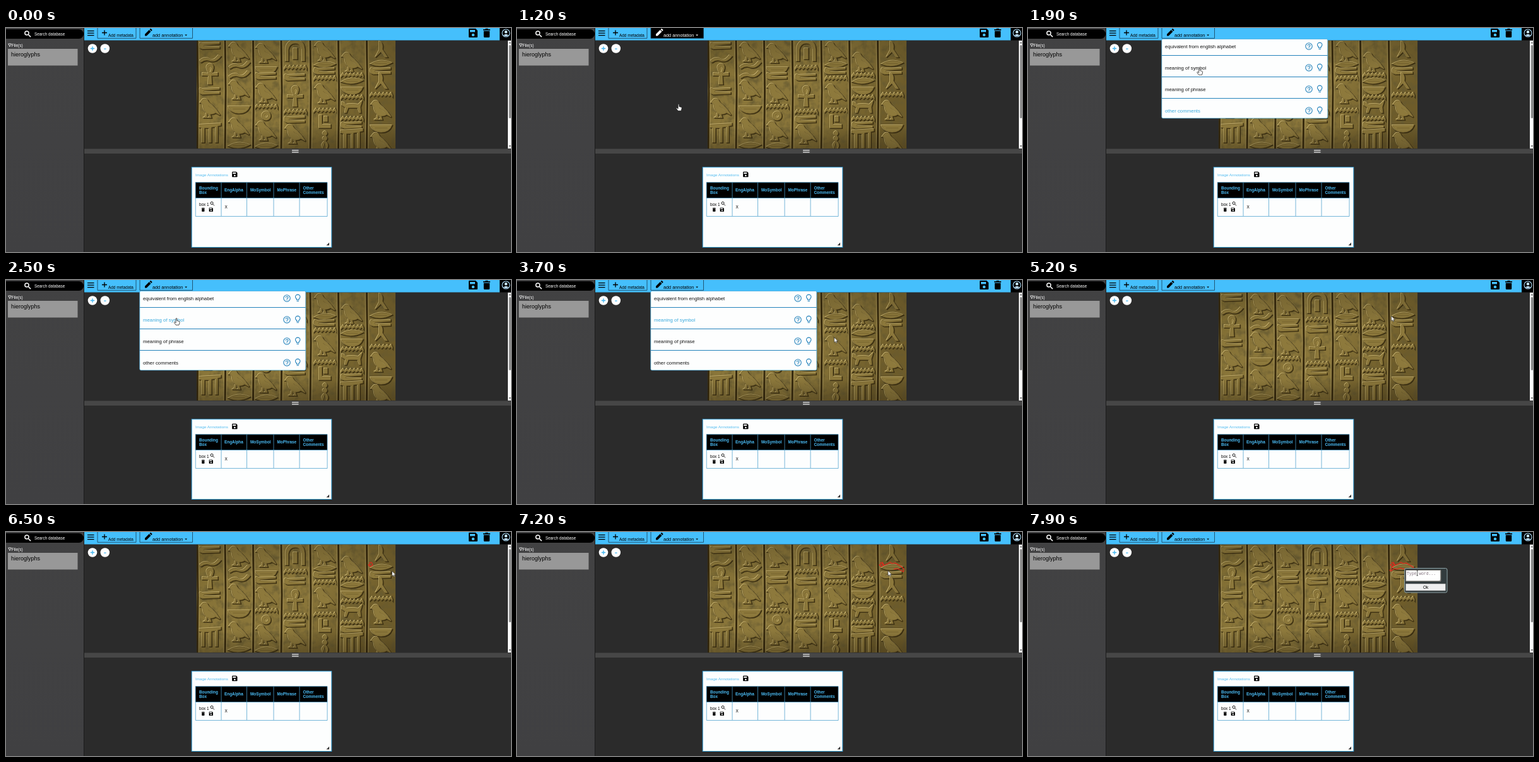
Recreate the animation shown at these times as an HTML page. Size 800x355 px, loop 8 s.

```html
<!DOCTYPE html>
<html lang="en">
<head>
<meta charset="utf-8">
<title>Image annotation</title>
<style>
html, body { margin: 0; width: 100%; height: 100%; overflow: hidden; background: #2b2b2b }
svg { display: block; width: 100vw; height: 100vh }
text { font-family: "Liberation Sans", Arial, sans-serif; font-size: 6.4px }
.menu text { font-size: 7.8px }
.head text { font-weight: bold; fill: #4bbcf5 }
.line { fill: none; stroke: currentColor }
</style>
</head>
<body>
<svg viewBox="0 0 800 355">
<defs>
  <linearGradient id="side" x2="0" y2="1">
    <stop stop-color="#424243"/><stop offset="1" stop-color="#404042"/>
  </linearGradient>
  <linearGradient id="stone" x2="1" y2=".35">
    <stop stop-color="#7c6a31"/><stop offset=".3" stop-color="#8a763a"/>
    <stop offset=".65" stop-color="#8a763a"/><stop offset="1" stop-color="#6e5c2a"/>
  </linearGradient>
  <linearGradient id="shade" x2="0" y2="1">
    <stop stop-color="#20180a" stop-opacity=".2"/><stop offset=".3" stop-opacity="0"/>
    <stop offset=".8" stop-opacity="0"/><stop offset="1" stop-color="#20180a" stop-opacity=".3"/>
  </linearGradient>
  <filter id="mottle" x="0" y="0" width="1" height="1">
    <feTurbulence type="fractalNoise" baseFrequency=".09" numOctaves="3" seed="4"/>
    <feColorMatrix values="0 0 0 0 .13  0 0 0 0 .1  0 0 0 0 .03  2 0 0 0 -.85"/>
  </filter>
  <clipPath id="wall"><path d="M302 20h315v171h-315z"/></clipPath>

  <path id="bird" d="M-16-8L-12-13Q-8-16-4-12Q-2-7 4-3Q11 4 16 12L9 8Q4 11 0 10L2 16H-4L-1 15L-2 10L-4 9L-5 16H-11L-7 14L-6 8Q-11 4-11-3Q-12-8-16-8ZM-3-3Q3 0 9 8"/>
  <path id="eye" d="M-17 1Q0-9 17-1Q0 8-17 1ZM-10 0H9"/>
  <path id="bowl" d="M-17-4H17Q13 7 0 7Q-13 7-17-4ZM-10 0H10"/>
  <path id="wave" d="M-17 1l3-4 3 4 3-4 3 4 3-4 3 4 3-4 3 4 3-4 3 4 3-4 2 4v2l-2-3-3 3-3-3-3 3-3-3-3 3-3-3-3 3-3-3-3 3-3-3-3 3z"/>
  <path id="ankh" d="M-2-1Q-8-11-4-15Q0-18 4-15Q8-11 2-1L12-2V2H2L3 16H-3L-2 2H-12V-2ZM-1-3Q-5-11 0-13Q5-11 1-3Z"/>
  <path id="loop" d="M-17-3Q-17-6-12-4L15-5V-3L-10-1V1L15 2V4L-12 5Q-19 3-17-3Z"/>
  <path id="snake" d="M-16 3Q-8-4 0 1Q6 5 13-5L17-3Q9 7 0 4Q-7 1-14 6Z"/>
  <path id="ball" d="M-7 0a7 7 0 1 0 14 0a7 7 0 1 0-14 0M-3 0a3 3 0 1 0 6 0a3 3 0 1 0-6 0"/>
  <path id="seat" d="M-9-10H-5V5H9V10H-9ZM-1-8H4V0H-1Z"/>
  <path id="gate" d="M-18-12L17-14V-11L12-10V16H9V-9L2-8V16H-1V-7L-9-7V16H-13V-7L-18-8Z"/>
  <path id="arch" d="M-15 15V-4Q-14-18 0-18Q14-18 15-4V15H11V-3Q9-13 0-13Q-9-13-11-3V15ZM-3 12V-5H3V12Z"/>
  <path id="beast" d="M-16-7L-12-6L-9-3Q0-5 10-3L16-9L13 1L14 10H12L9 2H-6L-9 10H-11L-10 2L-16-2Z"/>
  <path id="reed" d="M-3-13Q4-11 2 0L10 12H7L0 3L-9 12L-3 1Z"/>
  <path id="chain" d="M0-13Q7-9 0-5Q-7-9 0-13M0-5Q7-1 0 3Q-7-1 0-5M0 3Q8 8 3 15M0 3Q-8 8-3 15"/>

  <g id="lens" class="line"><circle cx="-1.3" cy="-1.3" r="2.7"/><path d="M.8.8L4 4"/></g>
  <path id="disk" fill-rule="evenodd" d="M-7-6Q-7-7-6-7H4L7-4V6Q7 7 6 7H-6Q-7 7-7 6ZM-5-5V-1.5H3V-5ZM-2.3 3a2.3 2.3 0 1 0 4.6 0a2.3 2.3 0 1 0-4.6 0"/>
  <path id="bin" d="M-5.5-6H-2.5L-1.5-7H1.5L2.5-6H5.5V-4.3H-5.5ZM-4.7-3.3H4.7V5.5Q4.7 7 3.2 7H-3.2Q-4.7 7-4.7 5.5Z"/>
  <path id="pencil" d="M-5.5 2.5L2-5L5-2L-2.5 5.5H-5.5ZM2.8-5.8L4-7Q4.6-7.5 5.2-7L7-5.2Q7.5-4.6 7-4L5.8-2.8Z"/>
</defs>

<rect width="800" height="355" fill="#2b2b2b"/>

<!-- sidebar -->
<rect width="123" height="355" fill="url(#side)"/>
<path d="M123.5 0V355" stroke="#1c1c1c"/>
<path d="M0 2H115.500a7.500 7.500 0 0 1 0 15H0z"/>
<use href="#lens" transform="translate(34.500 9.500) scale(1.150)" color="#fff" stroke-width="1.300"/>
<text x="45" y="11.700" fill="#fff">Search database</text>
<path d="M3.700 25H8.300L6 29.500Z" class="line" color="#fff" stroke-width=".8"/>
<text x="8.800" y="29.800" fill="#fff">File(s)</text>
<rect x="3" y="33" width="110.500" height="26.500" fill="#989898"/>
<text x="8" y="45" style="font-size:9px">hieroglyphs</text>

<!-- photo -->
<g id="photo" clip-path="url(#wall)"><rect x="302" y="20" width="315" height="171" fill="url(#stone)"/></g>

<!-- toolbar -->
<path d="M124 0H782V19.500H124z" fill="#45bffc"/>
<path d="M782 0H800V19.500H782z"/>
<path d="M129 4.700H139.500M129 8.200H139.500M129 11.700H139.500" stroke="#000" stroke-width="1.300"/>
<path d="M145 -1H206V16.300H145z" class="line" color="#1c4a66" stroke-width=".9"/>
<path d="M156 3.500V11.500M152 7.500H160" stroke="#000" stroke-width="1.300"/>
<text x="162" y="14">Add metadata</text>
<g id="addBtn">
  <path id="addBox" d="M212 -1H295.500V16.300H212z" stroke="#1c4a66" stroke-width=".9"/>
  <use href="#pencil" transform="translate(225 7.500) scale(.9)"/>
  <text x="232" y="13.700" style="font-size:7.300px">add annotation</text>
  <path d="M283.300 10.500H287L285.150 12.600z"/>
</g>
<use href="#disk" x="740" y="8"/>
<use href="#bin" x="761.500" y="8"/>
<g class="line" color="#a9d9f5" stroke-width="1.100"><circle cx="792" cy="8" r="6"/></g>
<path d="M789.700 6.200a2.300 2.300 0 1 0 4.600 0a2.300 2.300 0 1 0-4.600 0M788 11.800Q792 7.800 796 11.800Q792 14 788 11.800" fill="#c8e8fa"/>

<g fill="#fff"><circle cx="137" cy="32.500" r="7.300"/><circle cx="156.800" cy="32.500" r="7.300"/></g>
<path d="M137 29.300V35.700M133.800 32.500H140.200M155.200 33.200H158.600" stroke="#3fb4ef" stroke-width="1.300"/>

<!-- scroll bar and divider -->
<path d="M795 20H800V191H795z" fill="#fafafa"/>
<rect x="796.700" y="27" width="3.300" height="116" rx="1.600" fill="#8d8d8d"/>
<path d="M796.500 24.500L798.300 21.500L800 24.500ZM796.500 186L798.300 189L800 186Z" fill="#777"/>
<path d="M124 191.500H800V199H124z" fill="#474747"/>
<path d="M453 193.800H463.500M453 196.800H463.500" stroke="#eee" stroke-width="1.200"/>

<!-- annotation card -->
<rect x="294.200" y="220.700" width="221.600" height="126.800" fill="#fdfefe" stroke="#359fd6"/>
<path d="M512 340V344.500H507.500z" fill="#333"/>
<text x="300" y="234.500" fill="#55bdf0" style="font-size:6.250px">Image Annotations</text>
<use href="#disk" transform="translate(362.300 232) scale(.6)"/>
<path d="M300 244.500H509V269.500H300z"/>
<path d="M300.300 244.800H509V298.500H300.300zM300 269.500H509M341 245V298M381.500 245V298M424 245V298M465 245V298" class="line" color="#4a9fcc" stroke-width=".75"/>
<g class="head">
  <text x="306" y="255.500">Bounding</text><text x="306" y="262.800">Box</text>
  <text x="346" y="259.300">EngAlpha</text><text x="387" y="259.300">MoSymbol</text>
  <text x="429.500" y="259.300">MoPhrase</text>
  <text x="470.500" y="255.500">Other</text><text x="470.500" y="262.800">Comments</text>
</g>
<text x="306" y="282.300">box 1</text><text x="346.500" y="286.300">X</text>
<use href="#lens" transform="translate(327 278.500) scale(.75)" stroke-width="1.200"/>
<use href="#bin" transform="translate(312.300 287.800) scale(.45)"/>
<use href="#disk" transform="translate(324.800 287.800) scale(.45)"/>

<g id="menu" class="menu">
  <rect x="211.800" y="17.500" width="263" height="125.500" rx="2" fill="#fdfefe" stroke="#3aa5dc" stroke-width=".7"/>
</g>

<path id="mark" class="line" color="#e8261c" stroke-width="1.100" stroke-linejoin="round" pathLength="100"
  d="M575 49l4-1 2 4-4 3-3-3 5-2 2 3L588 50l3-2 3 2 5-1 5 3 5 3 4 4-1 4-5-3-5-2-6 1-6-2-6 2-4-1-5 4-2-1 3-4 3-3"/>

<g id="popup">
  <rect x="596.500" y="57.500" width="67.500" height="38.500" rx="2.500" fill="#333c3e" stroke="#8fa5a8"/>
  <path d="M598.500 60.500H654V78H598.500z" fill="#fff" stroke="#111" stroke-width="1.200"/>
  <path d="M598.500 60.500H654V78H598.500z" class="line" color="#e8e5d8" stroke-width=".5"/>
  <text x="600" y="68" fill="#80707c" style="font-family:'Liberation Mono',monospace">Type word...</text>
  <path d="M654 77.500L651.500 77.500L654 75z" fill="#777"/>
  <path d="M598.300 82H661.500V93H598.300z" fill="#efefef" stroke="#777" stroke-width=".6"/>
  <text x="630" y="89.800" text-anchor="middle">Ok</text>
</g>

<g id="cursor" stroke-linejoin="round">
  <path id="arrow" d="M0 0V8L1.900 6.300L3.200 9L4.500 8.400L3.300 5.800H5.800z" fill="#fff" stroke="#222" stroke-width=".6"/>
  <path id="hand" d="M-.9 0Q0-1 .9 0V3.500L4.500 4.500Q5.300 5 5 7L4 10.300H-1L-3.700 6.500Q-3.500 5-2.200 5.900L-.9 7z" fill="#fff" stroke="#111" stroke-width=".7"/>
  <path id="beam" d="M-1.300 0H1.300M0 0V8M-1.300 8H1.300" class="line" color="#333" stroke-width=".8"/>
</g>
</svg>
<script>
const $ = id => document.getElementById(id);
const add = (id, markup) => $(id).insertAdjacentHTML('beforeend', markup);

// Each column: centre x, then "glyph y" pairs from top to bottom
const columns = [
  [323, 'loop 28 snake 48 ankh 73 loop 100 bird 126 gate 165'],
  [369, 'bird 37 snake 58 snake 73 bird 97 bowl 128 bird 157 eye 186'],
  [412, 'bird 39 bowl 66 loop 76 bird 102 wave 124 ball 139 bird 162 eye 187'],
  [458, 'arch 37 wave 62 loop 78 ankh 108 wave 132 loop 145 bird 167'],
  [505, 'bird 36 eye 58 loop 68 wave 79 bird 103 wave 130 seat 148 chain 176'],
  [548, 'bird 53 wave 74 eye 84 bowl 98 wave 109 beast 124 wave 143 loop 154 gate 174'],
  [594, 'reed 34 eye 56 loop 68 reed 84 wave 105 bird 129 bowl 158 bird 180']
];
add('photo', '<rect x="302" y="20" width="315" height="171" filter="url(#mottle)"/>');
for (const [x, list] of columns) {
  const words = list.split(' ');
  for (let i = 0; i < words.length; i += 2) {
    const use = (d, style) =>
      `<use href="#${words[i]}" x="${x + d}" y="${+words[i + 1] + d}" ${style}/>`;
    add('photo', use(1, 'fill="#33280e" stroke="#33280e" stroke-width="2.200" opacity=".85"') +
      use(-.4, 'fill="#947f40" stroke="#c2ae6c" stroke-width="1.100"') +
      use(.4, 'fill="#8d793c" stroke="#5c4a1f" stroke-width=".5" fill-rule="evenodd"'));
  }
}
for (const x of [303, 347, 391.5, 436, 482, 526.5, 571.5])
  add('photo', `<g fill="none"><path d="M${x} 20l1 80-1 91" stroke="#382b0e" stroke-width="3"/>
    <path d="M${x + 2.3} 20l1 80-1 91M${x - 2.3} 20l1 80-1 91" stroke="#a8955a" stroke-width=".9"/></g>`);
add('photo', '<rect x="302" y="20" width="315" height="171" fill="url(#shade)"/>');

['equivalent from english alphabet', 'meaning of symbol', 'meaning of phrase', 'other comments']
  .forEach((label, i) => {
    const y = 29 + i * 34;
    add('menu', `<text class="item" x="217" y="${y + 2.8}">${label}</text>
      <g class="line" color="#2382bb" stroke-width="1.100">
        <circle cx="445" cy="${y}" r="5.200"/>
        <path d="M443.300 ${y - 1}q0-2 1.800-2t1.800 1.700q0 1-1.800 2.200v.8m0 .9v1"/>
        <path d="M460.500 ${y + 2.5}v-1.500q-2-1.300-2-3.200a3.700 3.700 0 0 1 7.400 0q0 1.900-2 3.200v1.500zM460.500 ${y + 4.5}h3.400"/>
        ${i < 3 ? `<path d="M212 ${y + 14.5}H474.500"/>` : ''}
      </g>`);
  });
const items = document.querySelectorAll('.item');

// Pointer tip: time, x, y
const track = [
  [400, 340, 70], [800, 254, 10], [1000, 254, 11], [1200, 256, 121], [1500, 260, 127],
  [1900, 271.5, 64], [2500, 270, 61], [3400, 270, 61], [3700, 502.5, 91], [4300, 560, 78],
  [5200, 575.5, 57], [5800, 577, 51], [6500, 611.5, 62], [7100, 590, 62], [7500, 576, 58],
  [7800, 606, 80], [7900, 616.7, 61]
];
function pointer(t) {
  const i = track.findIndex(k => k[0] > t);
  if (i < 1) return track.at(i).slice(1);
  const [a, b] = [track[i - 1], track[i]];
  const u = (t - a[0]) / (b[0] - a[0]), e = u * u * (3 - 2 * u);
  return [a[1] + (b[1] - a[1]) * e, a[2] + (b[2] - a[2]) * e];
}
const show = (id, on) => $(id).setAttribute('display', on ? 'inline' : 'none');
const within = (t, from, to) => t >= from && t < to;

function draw(now) {
  const t = Math.floor(now % 8000 / 100) * 100;
  const hover = within(t, 700, 1300);
  $('addBtn').setAttribute('fill', hover ? '#fff' : '#000');
  $('addBox').setAttribute('fill', hover ? '#000' : 'none');

  show('menu', within(t, 1300, 4000));
  const active = t < 2000 ? 3 : 1;
  items.forEach((el, i) => el.setAttribute('fill', i === active ? '#38a9dd' : '#111'));

  const drawn = t < 6000 ? 0 : t <= 6500 ? 18 : Math.min(100, 18 + (t - 6500) * .075);
  show('mark', drawn);
  $('mark').setAttribute('stroke-dasharray', drawn + ' 200');
  show('popup', t >= 7900);

  const hand = within(t, 700, 3500), beam = t >= 7900;
  show('cursor', t >= 400);
  show('hand', hand);
  show('beam', beam);
  show('arrow', !hand && !beam);
  $('cursor').setAttribute('transform', `translate(${pointer(t)})`);
  requestAnimationFrame(frame);
}
let start;
function frame(now) {
  start ??= now;
  draw(now - start);
}
draw(0);
</script>
</body>
</html>
```
